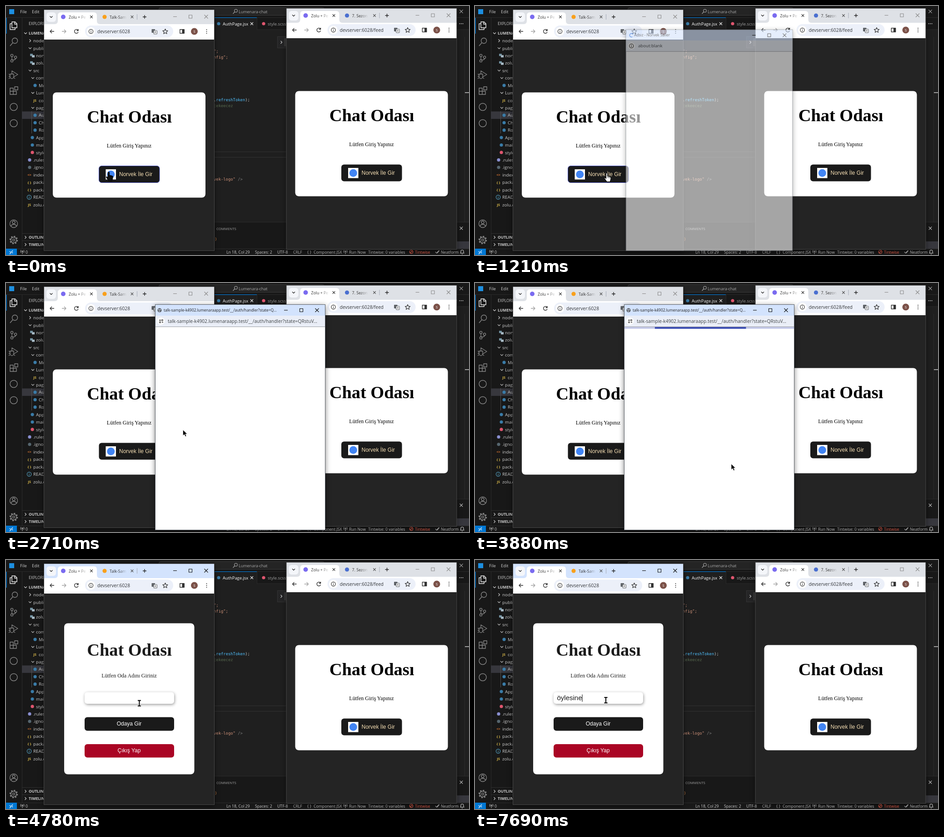
Animation, 1019 px wide and 549 px high, one loop 8 s. Source, as an HTML page:

```html
<!DOCTYPE html>
<html lang="tr">
<head>
<meta charset="utf-8">
<title>Chat Odası</title>
<style>
html, body { margin: 0; width: 100%; height: 100%; overflow: hidden; background: #181818; }
svg { display: block; width: 100%; height: 100%; font-family: "Open Sans", "Noto Sans", sans-serif; }
text { white-space: pre; }
.mono { font-family: "DejaVu Sans Mono", "Liberation Mono", monospace; }
.serif { font-family: "Liberation Serif", serif; }
.sans { font-family: "Liberation Sans", sans-serif; }
.win { filter: drop-shadow(0 3px 6px rgba(0,0,0,.5)); }
.strip { fill: #dee1e6; }
.controls { stroke: #8c8c8c; }
.active .strip { fill: #d3e3fd; }
.active .controls { stroke: #111; }
</style>
</head>
<body>
<svg id="stage" viewBox="0 0 1019 549" xmlns="http://www.w3.org/2000/svg"></svg>
<script>
const LOOP = 8000;
const rect = (x, y, w, h, fill, rx = 0, more = '') =>
  `<rect x="${x}" y="${y}" width="${w}" height="${h}" rx="${rx}" fill="${fill}" ${more}/>`;
const dot = (x, y, r, fill, more = '') => `<circle cx="${x}" cy="${y}" r="${r}" fill="${fill}" ${more}/>`;
const ring = (x, y, r, color, w = 1.1) => dot(x, y, r, 'none', `stroke="${color}" stroke-width="${w}"`);
const line = (d, color, w = 1.1) =>
  `<path d="${d}" fill="none" ${color ? `stroke="${color}"` : ''} stroke-width="${w}" stroke-linejoin="round"/>`;
const text = (x, y, s, size, fill, more = '') =>
  `<text x="${x}" y="${y}" font-size="${size}" fill="${fill}" ${more}>${s}</text>`;
const mid = 'text-anchor="middle"';
const cross = (x, y, r, color, w) => line(`M${x - r} ${y - r}l${2 * r} ${2 * r}m0 ${-2 * r}l${-2 * r} ${2 * r}`, color, w);
const chevron = (x, y, color, open = true, r = 3) =>
  line(open ? `M${x - r} ${y - r / 2}l${r} ${r}l${r} ${-r}` : `M${x - r / 2} ${y - r}l${r} ${r}l${-r} ${r}`, color);
const dots = (x, y, dx, dy, color) => [-1, 0, 1].map(i => dot(x + i * dx, y + i * dy, 1, color)).join('');
const info = (x, y, color) => ring(x, y, 4.6, color, 1.2) + line(`M${x} ${y - .5}v3m0 -5.2v1.2`, color, 1.2);

function activityBar() {
  const g = '#868686';
  return rect(0, 26, 1.5, 35, '#0078d4') +
    line('M13 35h7l4 4v9h-11zM19 35v5h5M13 39h-4v13h11v-4', '#f0f0f0', 1.4) +
    ring(19.5, 76.5, 6, g, 1.4) + line('M15 81l-6 7', g, 1.5) +
    ring(13, 109, 2.6, g, 1.3) + ring(13, 121, 2.6, g, 1.3) + ring(21, 113, 2.6, g, 1.3) +
    line('M13 112v6M21 116c0 3-4 3-8 3', g, 1.3) +
    line('M13 150v-7l13 8l-10 6M9 150h8v6a4 4 0 0 1-8 0zM6 150l3 2M6 155h3M6 160l3-2M20 160l-3-2', g, 1.3) +
    line('M9 181h7v14h-7zM9 188h14v7h-14M19 178h7v7h-7z', g, 1.4) +
    ring(17, 222.5, 8, g, 1.4) + ring(17, 258.5, 8, g, 1.4) +
    ring(17, 480, 8.5, g, 1.3) + ring(17, 477, 3, g, 1.3) + line('M11 486c1-6 11-6 12 0', g, 1.3) +
    ring(17, 516, 6.2, g, 1.5) + ring(17, 516, 2.4, g, 1.3) +
    dot(17, 516, 8, 'none', `stroke="${g}" stroke-width="2.5" stroke-dasharray="3.2 3.08"`);
}

function sidebar() {
  // indent, kind, label; one row every 16.4 px
  const rows = [
    [56, '>', 'node_modules'], [56, 'v', 'public'], [66, 'img', 'norvek.png'], [66, 'file', 'zolu.svg'],
    [56, 'v', 'src'], [62, 'v', 'components'], [72, 'atom', 'Message.jsx'], [62, 'v', 'Lumenara'],
    [72, 'JS', 'config.js'], [62, 'v', 'pages'], [72, 'atom', 'AuthPage.jsx'], [72, 'atom', 'ChatPage.jsx'],
    [72, 'atom', 'RoomPage.jsx'], [66, 'atom', 'App.jsx'], [66, 'atom', 'main.jsx'], [66, 'pink', 'style.scss'],
    [60, 'violet', '.rules.cjs'], [60, 'slate', '.ignore'], [60, '&lt;&gt;', 'index.html'], [60, '{ }', 'package-lock.json'],
    [60, '{ }', 'package.json'], [60, 'info', 'README.md'], [60, 'JS', 'zolu.config.js']];
  const marks = { atom: '#3a7ca8', pink: '#e0566f', violet: '#8a8fd0', slate: '#56666f' };
  const letters = { JS: '#d9b94a', '{ }': '#d9b94a', '&lt;&gt;': '#e37933' };
  const icon = (x, y, kind) => {
    if (kind === 'v' || kind === '>') return chevron(x - 3, y, '#ccc', kind === 'v');
    if (marks[kind]) return dot(x - 8, y, 3.6, marks[kind]);
    if (letters[kind]) return text(x - 8.5, y + 3, kind, 7.5, letters[kind], mid + ' font-weight="700"');
    if (kind === 'info') return info(x - 9, y, '#519aba');
    return rect(x - 13, y - 4, 6, 5, '#7494a3') + rect(x - 9, y - 1, 6, 5, '#a7b9c4');
  };
  return text(50, 42, 'EXPLORER', 8.5, '#ccc') + chevron(43, 60, '#ccc') +
    text(50, 63, 'LUMENARA-CHAT', 8.5, '#ccc', 'font-weight="700"') + rect(35, 232.5, 60, 16.4, '#37373d') +
    line('M56.5 232v49', '#505050') +
    rows.map(([x, kind, label], i) => {
      const y = 76.5 + i * 16.43;
      return icon(x, y, kind) + text(x + (kind.length === 1 ? 4 : 0), y + 3.6, label, 9.8, '#ccc');
    }).join('') +
    [['OUTLINE', 510], ['TIMELINE', 526]].map(([s, y]) => line(`M35 ${y - 8.5}h60`, '#2f2f2f') +
      chevron(43, y, '#ccc', false) + text(50, y + 3.3, s, 8.5, '#ccc', 'font-weight="700"')).join('');
}

function editor() {
  const code = (x, y, s, fill) => text(x, y, s, 8.85, fill, 'class="mono"');
  const grey = '#ccc';
  return rect(0, 0, 1019, 549, '#1f1f1f') + rect(0, 0, 1019, 25, '#181818') + rect(0, 25, 84, 511, '#181818') +
    rect(458, 25, 561, 27, '#181818') + rect(458, 25, 94, 27, '#1f1f1f') + rect(84, 476, 935, 60, '#181818') +
    line('M0 25.5h1019M35.5 25v510M552.5 26v26H1019M458 476.5h561', '#2b2b2b') + rect(440, 25, 112, 1.2, '#0078d4') +
    rect(7, 7, 11, 11, '#1d8fe0') + text(31, 16, 'File', 9.4, grey) + text(57, 16, 'Edit', 9.4, grey) +
    rect(336.5, 3.5, 364, 17, '#242424', 4, 'stroke="#3a3a3a"') +
    ring(506, 10.5, 3.3, '#aaa') + line('M503.5 13l-4 4', '#aaa') + text(512, 16, 'Lumenara-chat', 9, '#aaa') +
    cross(1002, 12, 3.6, '#aaa') +
    dot(468, 39, 3.6, '#3a7ca8') + text(477, 42.5, 'AuthPage.jsx', 9.4, '#fff') + cross(541, 39, 3, '#eee') +
    dot(567, 39, 3.6, '#e0566f') + text(576, 42.5, 'style.scss', 9.3, '#9d9d9d') + dots(1002, 39, 3.5, 0, grey) +
    code(457, 103, '";', '#ce9178') + code(457, 116, 'nfig";', '#ce9178') +
    code(457, 210, '.<tspan fill="#4fc1ff">refreshToken</tspan>);', grey) + code(457, 223, 'cekeecez', '#57694e') +
    code(457, 384.5, 'vek-logo" <tspan fill="#808080">/&gt;</tspan>', '#ce9178') +
    line('M458 321.5h160M458 333.5h160', '#323232') +
    rect(597.5, 67.5, 30, 25, '#252526', 0, 'stroke="#343434"') + rect(612, 71, 10, 18, '#3a3a3a') + chevron(606, 80, grey, false) +
    line('M1009.5 68v408', '#2b2b2b') + rect(1010, 68, 9, 199, '#3a3a3a', 0, 'id="scrollbar"') +
    rect(1010, 190, 9, 2, '#a0a0a0') +
    text(463, 493.5, 'COMMENTS', 7.8, '#9d9d9d') + cross(1002, 490, 3.3, grey) + code(454, 517, '3)', '#d98a4a') +
    rect(991, 519, 28, 16, '#37373d');
}

function statusBar() {
  const items = [[43, '0'], [485, 'Ln 18, Col 29'], [548, 'Spaces: 2'], [597, 'UTF-8'], [632, 'CRLF'], [663, '{ }'],
    [677, 'Component JSX'], [755, 'Run Now'], [797, 'Tintwise: 0 variables'], [957, 'Neatform']];
  const g = '#ccc';
  return rect(0, 535, 1019, 14, '#181818') + line('M0 535.5h1019', '#2b2b2b') + rect(0, 535, 24, 14, '#0078d4') +
    line('M8 541l3 3l-3 3M15 539l-3 3l3 3', '#fff') + items.map(([x, s]) => text(x, 545.8, s, 8.7, g)).join('') +
    [36, 747].map(x => ring(x, 541, 1.2, g) + line(`M${x} 542v5M${x - 3} 538q-2 3 0 6M${x + 3} 538q2 3 0 6`, g, .9)).join('') +
    ring(892, 542, 3.7, '#f4604c') + line('M889.5 544.5l5-5', '#f4604c') + text(900, 545.8, 'Tintwise', 8.7, '#f4604c') +
    line('M945 542l2.5 3l5-6M949 545l5-6', g) + line('M1000 545h8l-1-2v-2a3 3 0 0 0-6 0v2zM1003 547h2', g);
}

const controls = (x, y) => `<g class="controls">${line(`M${x - 4} ${y}h8`)}${
  line(`M${x + 30.5} ${y - 3.5}h7v7h-7z`)}${cross(x + 68.5, y, 4)}</g>`;

const loginCard = id => rect(103, 190.5, 336, 232, '#fff', 8) +
  text(271.5, 257, 'Chat Odası', 38.4, '#000', mid + ' class="serif" font-weight="700"') +
  text(271, 312, 'Lütfen Giriş Yapınız', 12, '#000', mid + ' class="serif"') +
  rect(204.5, 352.5, 133.5, 37, '#1a1a1a', 6, `id="${id}"`) + rect(219.5, 360, 22.5, 22.5, '#fff') +
  dot(230.8, 371.2, 8.5, '#4285f4') + text(249, 375, 'Norvek İle Gir', 12, '#f5deb3', 'class="sans"');

const roomCard = () => rect(128, 139.5, 286.5, 333, '#fff', 8) +
  text(271.5, 211, 'Chat Odası', 38.4, '#1a1a1a', mid + ' class="serif" font-weight="700"') +
  text(271, 259, 'Lütfen Oda Adını Giriniz', 12, '#1a1a1a', mid + ' class="serif"') +
  rect(173, 291.5, 197, 25.5, '#fff', 6, 'style="filter:drop-shadow(1px 2px 3px rgba(0,0,0,.4))"') +
  text(180.5, 309, '', 15, '#1a1a1a', 'class="sans" id="typed"') + rect(181, 296.5, 1, 16, '#000', 0, 'id="caret"') +
  rect(173, 346.5, 197, 30, '#1a1a1a', 6) + text(271, 365, 'Odaya Gir', 12, '#fff', mid + ' class="sans"') +
  rect(173, 406, 197, 29.5, '#aa0524', 6) + text(271, 424.3, 'Çıkış Yap', 12, '#fff', mid + ' class="sans"');

function browser(id, url, tab, tabColor, page) {
  const k = '#333';
  return `<g class="win" id="${id}">` + rect(83.5, 8.5, 375, 531, '#242424', 0, 'stroke="#484848"') +
    `<rect class="strip" x="84" y="8.5" width="374" height="32.5"/>` +
    rect(89, 14, 21, 21, '#f4f6fa', 6) + chevron(99.5, 24, '#222') +
    `<path d="M107 40q7 0 7-7v-12q0-7 7-7h72q7 0 7 7v12q0 7 7 7z" fill="#fff"/>` +
    dot(126, 24, 5, '#7a6bf0') + text(138, 27.5, 'Zolu + Pe', 8.8, 'url(#fade)') + cross(188, 24, 2.8, '#222') +
    dot(217, 24, 4.6, tabColor) + text(228, 27.5, tab, 8.8, 'url(#fade)') + cross(277.5, 24, 2.8, '#444') +
    line('M288.5 18v12', '#a9b0ba') + line('M301 24h8m-4 -4v8', '#222', 1.3) + controls(372, 23.5) +
    rect(84, 40, 374, 34, '#fff') +
    line('M106 56h-9m4 -4l-4 4l4 4', k, 1.4) + line('M123 56h9m-4 -4l4 4l-4 4', '#a4a4a4', 1.4) +
    line('M158.5 53.5a4.3 4.3 0 1 0 .5 4M159 51v3.5h-3.5', k, 1.4) +
    rect(174, 43, 194, 26, '#ecf0f9', 13) + dot(187, 56, 9.5, '#fff') + info(187, 56, k) +
    text(201, 59.7, url, 10.1, '#33363a') +
    rect(320.5, 51, 7.5, 8, '#5f6368', 1) + rect(325, 54, 7.5, 8, '#fff', 1, 'stroke="#5f6368"') +
    line('M326.5 57h4.5M328.8 56q0 3-2.3 4.5M328 58l3 2.5', '#5f6368', .8) +
    line('M350.5 50.5l1.6 3.7l4 .3l-3 2.7l.9 4l-3.5-2.1l-3.5 2.1l.9-4l-3-2.7l4-.3z', k, 1.2) +
    line('M382.8 51.8h9.4v8.4h-9.4z', k, 1.4) + rect(387.5, 52, 5, 8, k) +
    dot(414.5, 56, 7.5, '#7b5148') + text(414.5, 58.8, 'S', 7.5, '#fff', mid) + dots(441.5, 56, 0, 4, k) +
    page + '</g>';
}

const HOST = 'talk-sample-k4902.lumenaraapp.test/__/auth/handler?state=Q';
const popup = () => '<g class="win active" id="popup">' + rect(328.5, 47.5, 374, 497, '#fff', 0, 'stroke="#5a5f66"') +
  '<rect class="strip" x="329" y="48" width="373" height="24"/>' + controls(616, 60) +
  rect(329, 72, 373, 24, '#eaeef7') + line('M329 96.5h373', '#9a9da3') + dot(341, 84, 8, '#fff') +
  '<g id="blankTab">' + text(347, 63, 'Adsız - Norvek Sailer', 8.5, '#222') + info(341, 84, '#222') +
  text(356, 87.5, 'about:blank', 9.8, '#3c4043') +
  '<circle id="spinner" cx="341" cy="60" r="4" fill="none" stroke="#2b6fd6" stroke-width="1.5" pathLength="100"/></g>' +
  '<g id="authTab">' + dot(338, 60, 4.6, '#5f6368') + line('M335 58q3 3 6 0M336 62l3 1', '#d3e3fd') +
  text(347, 63, HOST + '...', 8.4, '#222') + text(356, 87.5, HOST + 'RstuV...', 10.2, '#3c4043') +
  line('M337 82h4M343 86.5h3', '#222', 1.3) + ring(344, 82, 1.5, '#222') + ring(339, 86.5, 1.5, '#222') + '</g>' +
  '<g id="progress">' + rect(329, 97, 373, 4, '#c5cae9') + rect(329, 97, 0, 4, '#3f51b5', 0, 'id="bar"') + '</g></g>';

const cursors = () => '<g id="hand" stroke="#000" stroke-width="1.1" stroke-linejoin="round">' +
  '<path d="M-1.5 1q1.5-2 3 0v6l6 1.5q2 .6 1.7 3l-1 5l-1 3h-7l-5-7q-1-2 .7-2.3l2.6 2z"/>' +
  line('M2 8v3M4.5 8.5v3M7 9v3', '', .8) + '</g>' +
  '<path id="arrow" d="M0 0v12.5l3-2.8l2.2 4.8l2.2-1l-2.2-4.6h4z" fill="#000" stroke="#fff" stroke-width=".6"/>' +
  '<g id="beam">' + line('M-3.5 -6h7M0 -6v12M-3.5 6h7', '#fff', 3.6) + line('M-3.5 -6h7M0 -6v12M-3.5 6h7', '#000', 2) + '</g>' +
  '<g id="thinBeam">' + line('M-3 -5.5h2.5l.5 .5l.5 -.5h2.5M0 -5v10M-3 5.5h2.5l.5 -.5l.5 .5h2.5', '#c4c4c4', 1) + '</g>';

document.getElementById('stage').innerHTML =
  '<defs><linearGradient id="fade"><stop offset=".55" stop-color="#333"/><stop offset="1" stop-color="#333" stop-opacity=".1"/></linearGradient></defs>' +
  editor() + activityBar() + sidebar() + statusBar() +
  browser('leftWin', 'devserver:6028', 'Talk-Sam', '#f9a01b',
    `<g id="login">${loginCard('leftButton')}</g><g id="room">${roomCard()}</g>`) +
  `<g transform="translate(533.5 -3)">${browser('rightWin', 'devserver:6028/feed', '7. Sezon', '#4a6fd0', loginCard('rightButton'))}</g>` +
  popup() + cursors();

const $ = id => document.getElementById(id);
const show = (id, on) => $(id).style.display = on ? '' : 'none';
const clamp = v => Math.min(1, Math.max(0, v));

const OPEN = 1110, NAVIGATE = 2240, REDIRECT = 3330, CLOSE = 3960, FADE = 170;
const path = [[0, 226, 366], [400, 252, 376], [810, 290, 369], [1210, 290, 368], [1620, 322, 401], [2000, 372, 340],
  [2440, 388, 323], [3260, 394, 327], [3600, 520, 384], [3880, 564, 399], [4230, 565, 399], [4830, 288, 314],
  [4970, 288, 314], [5100, 288, 309], [LOOP, 288, 309]];
const WORD = 'öylesine';
const keyTimes = [5910, 6240, 6700, 6770, 7100, 7230, 7560, 7690];

function pointer(t) {
  const i = path.findIndex(p => p[0] > t), [t0, x0, y0] = path[i - 1], [t1, x1, y1] = path[i];
  const p = (t - t0) / (t1 - t0), e = p * p * (3 - 2 * p);
  return [x0 + (x1 - x0) * e, y0 + (y1 - y0) * e];
}

function drawPointer(t) {
  const [x, y] = pointer(t);
  const overEditor = t > CLOSE && x > 458;
  let kind = 'arrow';
  if (t < 1690) kind = 'hand';
  else if (overEditor) kind = 'thinBeam';
  else if (t > CLOSE && x > 173 && x < 370 && y > 291 && y < 317) kind = 'beam';
  for (const id of ['hand', 'arrow', 'beam', 'thinBeam']) show(id, id === kind);
  $(kind).setAttribute('transform', `translate(${x} ${y})`);
  $('hand').setAttribute('fill', t < 300 || t > 1400 ? '#111' : '#fff');
  show('scrollbar', overEditor);
}

function drawPopup(t) {
  const closing = clamp((t - CLOSE) / FADE), alpha = clamp((t - OPEN) / FADE) * (1 - closing);
  const scale = 1 - .046 * (1 - alpha);
  show('popup', alpha > 0);
  $('popup').setAttribute('opacity', alpha);
  $('popup').setAttribute('transform', `translate(515.5 296.3) scale(${scale}) translate(-515.5 -296.3)`);
  $('popup').classList.toggle('active', !closing);
  show('blankTab', t < NAVIGATE);
  show('authTab', t >= NAVIGATE);
  const sweep = 4 + 70 * Math.cos(Math.PI * (t - 1210) / 820) ** 2;
  $('spinner').setAttribute('stroke-dasharray', `${sweep} 100`);
  $('spinner').setAttribute('transform', `rotate(${(t - 1210) * .45 + 60} 341 60)`);
  show('progress', t >= REDIRECT);
  const grow = clamp((Math.min(t, CLOSE) - 3163) / 1000);
  $('bar').setAttribute('x', 329 + 373 * .25 * grow);
  $('bar').setAttribute('width', 373 * .75 * grow);
}

function drawRoom(t) {
  const inRoom = t >= CLOSE;
  show('login', !inRoom);
  show('room', inRoom);
  $('leftWin').classList.toggle('active', inRoom || (t >= 880 && t < OPEN));
  $('leftButton').setAttribute('stroke', t < 1700 ? '#4f58c8' : 'none');
  $('typed').textContent = WORD.slice(0, keyTimes.filter(k => k <= t).length);
  show('caret', t >= 5100 && (t < 5650 || t >= 5910));
  $('caret').setAttribute('x', 180.5 + (inRoom ? $('typed').getComputedTextLength() : 0));
}

function draw(now) {
  const t = now % LOOP;
  drawRoom(t);
  drawPopup(t);
  drawPointer(t);
}

let start;
function tick(now) {
  start ??= now;
  draw(Math.max(0, now - start));
  requestAnimationFrame(tick);
}
draw(0);
requestAnimationFrame(tick);
</script>
</body>
</html>
```
